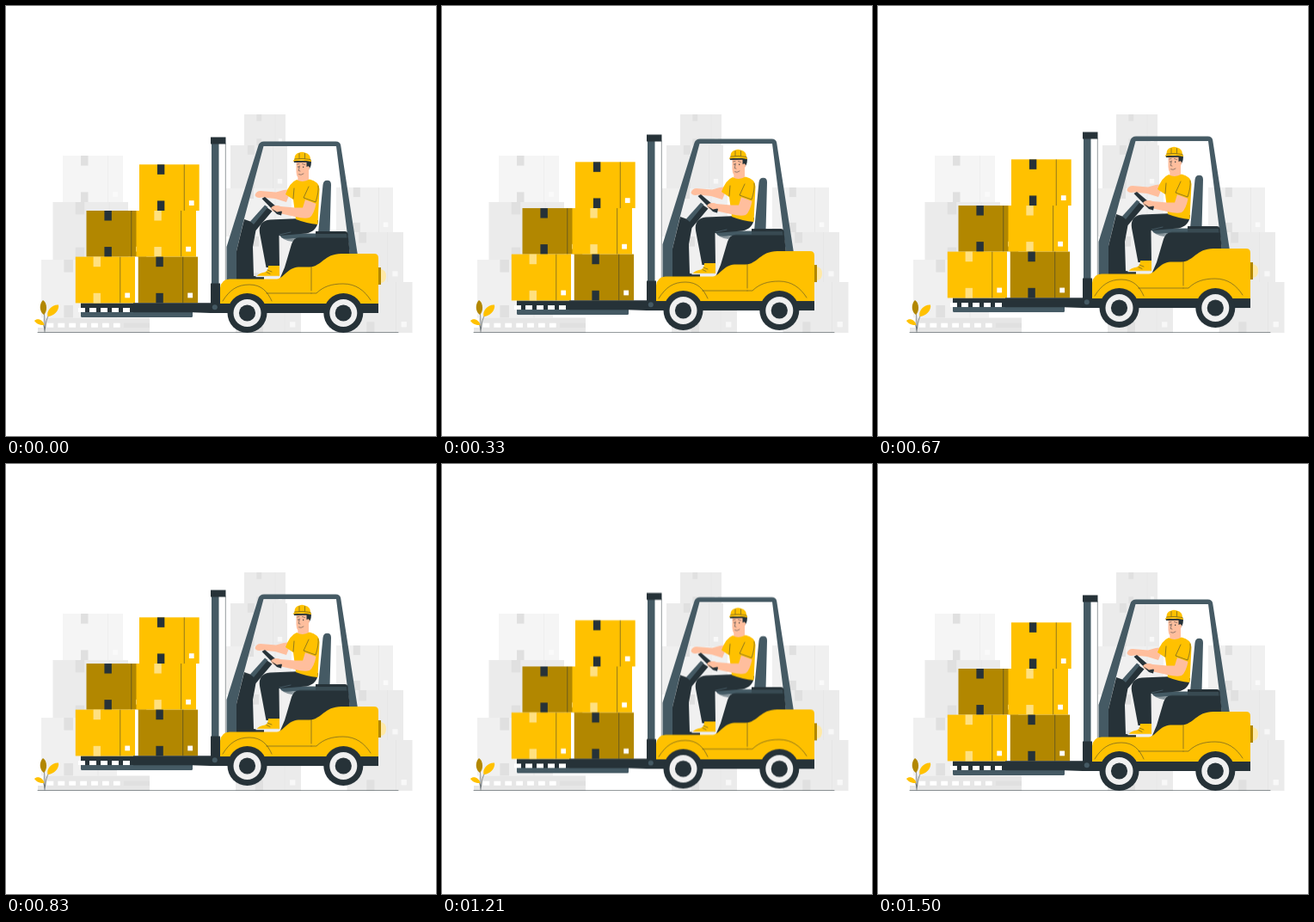
Write an HTML page that moves like this. It is 500x500 px and loops after 1540 ms.

```html
<!DOCTYPE html>
<html lang="en">
<head>
<meta charset="utf-8">
<title>Forklift</title>
<style>
  html, body { margin: 0; width: 100%; height: 100%; overflow: hidden; background: #fff; }
  svg { display: block; width: 100%; height: 100%; }
  #lift { animation: hover 1540ms linear infinite; }
  @keyframes hover {
    0%, 97.4%, 100% { transform: translateY(0); }
    48.7% { transform: translateY(-6.67px); }
  }
  .dark { fill: #263238; }
  .slate { fill: #455a64; }
  .gold { fill: #ffc100; }
  .ochre { fill: #b28700; }
  .skin { fill: #ffbe9d; }
  .line { fill: none; stroke: #263238; stroke-width: .5; stroke-linecap: round; }
</style>
</head>
<body>
<svg viewBox="0 0 500 500">
  <defs>
    <g id="wheel">
      <circle class="dark" r="23"/>
      <circle r="16" fill="#f0f0f0"/>
      <circle class="dark" r="9.6"/>
    </g>
  </defs>

  <g id="stock"></g>

  <g id="floor">
    <path d="M43 362.5H167V380H37V374H43Z" fill="#e6e6e6"/>
    <path d="M137 368.5H167V374H137Z" fill="#e0e0e0"/>
    <path d="M47.5 371.3H133" stroke="#fff" stroke-width="5" stroke-dasharray="7.8 5.1"/>
    <path class="line" d="M37 379.5H456"/>
  </g>

  <g id="plant">
    <path class="line" d="M45 379C45 368 45 358 43.500 350M45.500 375C46 366 49 359 54 353M45 377C45 371 42 368 38 366"/>
    <path class="ochre" d="M43 342C48 345 48.500 355 44 359C39 356 38 347 43 342Z"/>
    <path class="gold" d="M61 347.500C62.500 354 55 361 48.500 361C46.500 355 53 347 61 347.500Z"/>
    <path class="gold" d="M33 366C36 362.500 43 364 44.500 371C40 371.500 35 369.500 33 366Z"/>
  </g>

  <g id="lift">
    <g id="pallet">
      <path class="dark" d="M87 345.500H148V356.500H87Z"/>
      <path class="slate" d="M87 356H217V360.500Q217 362 215.500 362H88.500Q87 362 87 360.500Z"/>
      <path d="M84 353.500H146" stroke="#fff" stroke-width="5" stroke-dasharray="8 5"/>
    </g>
    <g id="load"></g>

    <g id="mast">
      <path class="slate" d="M239 159H247.500V324H239Z"/>
      <path class="line" d="M255.300 160V320"/>
      <path class="dark" d="M238 152.500H255.500V160.500H238Z"/>
      <path class="dark" d="M238 322.500H249V345.300H262V357H238L217 356.300H148V345.300H238Z"/>
      <circle class="slate" cx="242.800" cy="350.300" r="3"/>
    </g>

    <g id="cab">
      <path class="slate" fill-rule="evenodd" d="M256.500 319V280L293.500 162Q295 157.500 300 157.500H383.500Q388.500 157.500 389.200 162L409 290H400L384 163H299.500L276.500 249L268 285V319Z"/>
      <path class="dark" d="M277 248L287 251.500L301.500 233L309.500 238.500L290.500 261L287 280L288 314L300 315V318H268V285Z"/>
      <path class="slate" d="M284 250.500L301 231.500L304.500 234L288 254Z"/>
      <path class="slate" d="M368.500 208Q369 202.800 373.500 202.800Q378.200 202.800 378 208L376.500 264H363Z"/>
      <path class="slate" d="M317.500 264.500H365V270H334Q319 273 317.500 264.500Z"/>
      <path class="dark" d="M360 262H394Q397 262 397.500 265L400 290L360 304L318 318L324 304L332 277Q334 269 342 268.500H360Z"/>
      <path class="slate" d="M318 265H396L396.500 269.500H342Q335 269.500 333 274Q321 273 318 265Z" opacity=".6"/>
    </g>

    <g id="driver">
      <path class="skin" d="M332 213L326 228L313 224L298 222.500Q291 224 289.500 220Q291 215 296 215L314 216.500L323 214Z"/>
      <path class="dark" d="M343 247L307 248.500Q293 250 295 264L302.500 304H318L317.500 267L349 264.500Q362 262 363 249Z"/>
      <path class="line" d="M318 266L331 263" style="stroke:#607d8b"/>
      <path class="gold" d="M305 302H318V314.500H291Q294 310.500 301 309.500Q305 308 305 302Z"/>
      <path d="M290.500 314.500H318" stroke="#e8e8e8" stroke-width="1.400"/>
      <path class="line" d="M304 307L309 309M303 309.500L307 311.500"/>
      <path class="skin" d="M340 193L339 204Q345 209 352 204L352 190Z"/>
      <path class="gold" d="M338 202Q345 206 353 201.500Q364 204 364.500 213L362.500 254Q350 253 337 248L334 225L325 219Q330 205 338 202Z"/>
      <path class="skin" d="M348 225L361 228Q358 243 353 246Q348 248 336 245L318 241Q309 240 308 235Q311 230 319 233L336 234.500L345 234.500Z"/>
      <path class="gold" d="M351 206Q360 201 364 211Q364 219 361 230L345 224Z"/>
      <path class="line" d="M352 210L346 223L360 228Q364 216 363 209M334 224L335 212"/>
      <path class="dark" d="M297.500 224L301 222L321 239L320 243.500L315 242Z"/>
      <path class="skin" d="M308 235Q311 230 319 233L323 238L315 239.500Z"/>

      <path class="dark" d="M347 179H354.500Q356 186 352 190L347 190Z"/>
      <path class="skin" d="M337.500 180H349.500V187Q352.500 185 353 188Q353 191.500 350 192Q349 201 343.500 201Q338 201 337.500 193Z"/>
      <path class="line" d="M338.500 184L341 183.500M344.500 183.500L347.500 184.500M341.500 186L340.200 191.500L342 192M340.500 195.800Q343 197.300 346 195"/>
      <circle class="dark" cx="340" cy="187" r=".7"/>
      <circle class="dark" cx="345.700" cy="187.300" r=".7"/>
      <path class="dark" d="M334.500 180H354.500V182.200L349 181.800L335 182Z"/>
      <path class="gold" d="M333.500 180.500L335.500 178Q335 172 341 170.500Q344 169 347.500 170.500Q354 172 354 178L355.200 181Q345 179 333.500 180.500Z"/>
      <path class="line" d="M335.500 178Q345 176.500 354 178.500M341 177V171.500M347.500 177V171.500"/>
    </g>

    <g id="body">
      <path class="gold" d="M249 348V328Q250 318 260 317.500H315C322 317 328 304 340 303.500H353C367 303 370 288 390 288H428Q433 288 433 293V348Z"/>
      <path class="dark" d="M249 346H433V357H249Z"/>
      <path class="line" d="M252 343C260 330 269 324 283 324C297 324 304 332 309 343M303 334H355M355 303.500V331M355 334H361C369 326 379 323 392 323C407 323 417 331 424 342"/>
      <path d="M436 306Q442 307 442 314T436 322Z" fill="#ffe9a6"/>
      <path class="ochre" d="M433 304H436V324H433Z"/>
      <use href="#wheel" x="280.500" y="357"/>
      <use href="#wheel" x="392.300" y="357"/>
    </g>
  </g>
</svg>
<script>
  const NS = 'http://www.w3.org/2000/svg';

  function add(parent, tag, attrs) {
    const el = document.createElementNS(NS, tag);
    for (const key in attrs) el.setAttribute(key, attrs[key]);
    parent.append(el);
    return el;
  }

  function rect(parent, x, y, width, height, fill) {
    add(parent, 'rect', { x, y, width, height, fill });
  }

  // Tape, seam and label sit at fixed fractions of the box.
  function box(parent, x, y, w, h, [fill, tape, label, seam]) {
    const tapeX = x + w * .3, tapeW = w * .121, tapeH = h * .215;
    rect(parent, x, y, w, h, fill);
    rect(parent, tapeX, y, tapeW, tapeH, tape);
    rect(parent, tapeX, y + h - tapeH, tapeW, tapeH, tape);
    rect(parent, x + w * .83, y + h * .78, w * .083, w * .083, label);
    add(parent, 'path', {
      d: `M${x + w * .75} ${y}v${h}`, stroke: seam, 'stroke-width': .5
    });
  }

  const stock = document.getElementById('stock');
  const load = document.getElementById('load');
  const pale = ['#f5f5f5', '#e0e0e0', '#fafafa', '#e6e6e6'];
  const grey = ['#ebebeb', '#e0e0e0', '#f8f8f8', '#e0e0e0'];
  const light = ['#f0f0f0', '#e0e0e0', '#fafafa', '#e0e0e0'];
  const bright = ['#ffc100', '#263238', '#fff', '#263238'];
  const soft = ['#ffc100', '#ffe080', '#fff', '#263238'];
  const deep = ['#b28700', '#263238', '#fff', '#263238'];

  [
    [66, 174, 70, 54, pale],
    [54.5, 228, 87.5, 67, grey],
    [41, 295, 88, 67.5, light],
    [277, 126, 48, 36, grey],
    [261, 162, 66, 50, grey],
    [256, 212, 76, 56, light],
    [262, 268, 76, 54, light],
    [267, 322, 76, 58, grey],
    [384, 211, 66, 52, light],
    [388, 263, 74, 58, grey],
    [396.5, 321, 76, 59, grey]
  ].forEach(args => box(stock, ...args));

  [
    [155, 184.3, 69.7, 53.7, bright],
    [93.5, 238, 69.7, 53.6, deep],
    [151.5, 238, 69.5, 53.6, soft],
    [80.8, 291.6, 69.3, 53.8, soft],
    [153.5, 291.6, 69.6, 53.8, deep]
  ].forEach(args => box(load, ...args));
  rect(load, 150.1, 291.6, 3.4, 53.8, '#fff');
</script>
</body>
</html>
```
